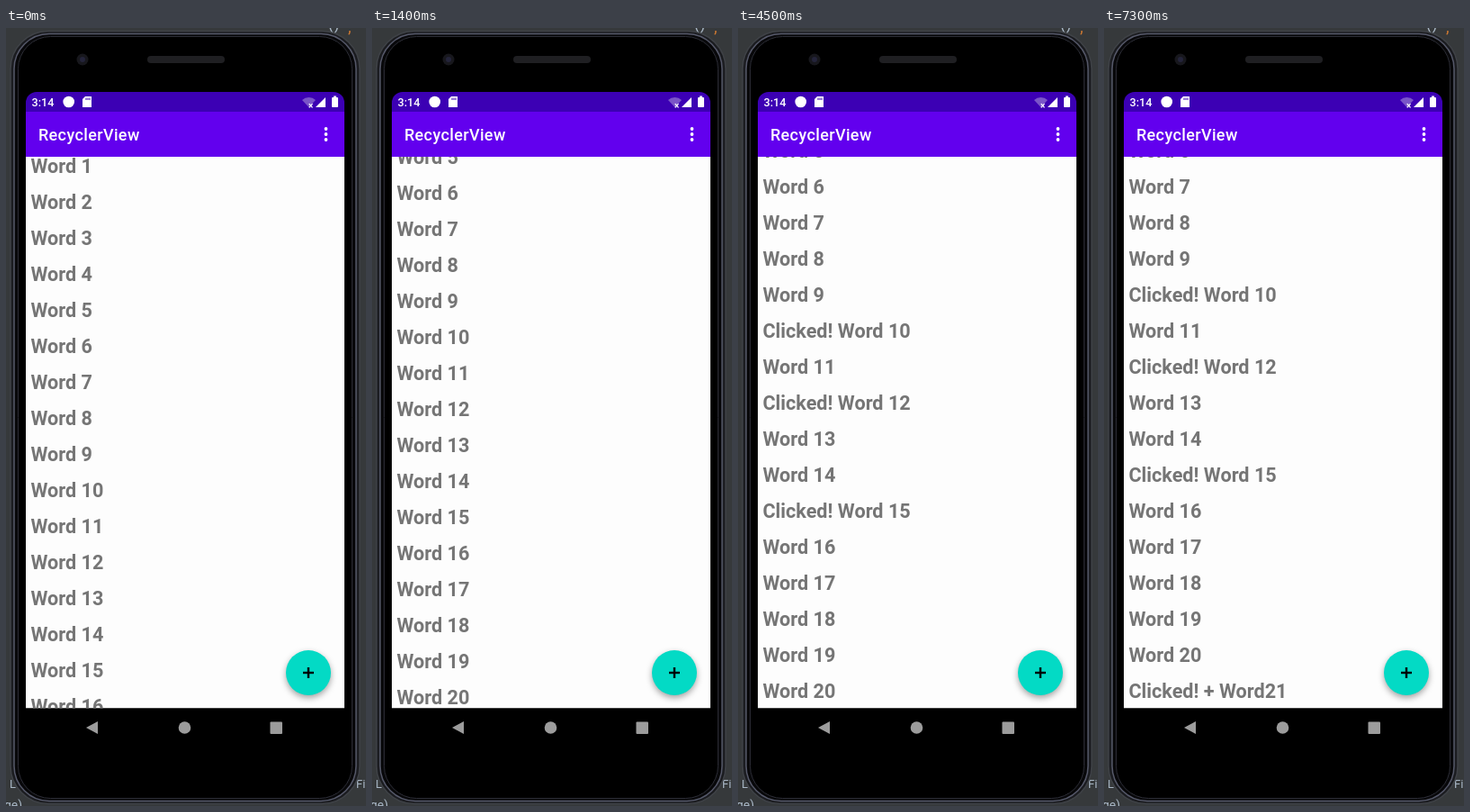
Recreate the animation shown at these times as an HTML page with a canvas. Size 400 px wide and 864 px high, loop 8 s.

```html
<!DOCTYPE html>
<html>
<head>
<meta charset="utf-8">
<style>
  html, body { margin: 0; height: 100%; overflow: hidden; background: #36393b; }
  canvas { display: block; width: 400px; height: 864px; }
</style>
</head>
<body>
<canvas id="stage" width="400" height="864"></canvas>
<script>
const ctx = document.getElementById('stage').getContext('2d');
const LOOP = 8000, STEP = 100, ROW = 40;
const LIST = { x: 22, y: 143, w: 354, h: 612.5 };
const PRIMARY = '#6200ee', PRIMARY_DARK = '#3c00b4', CODE = '#a9b7c6', NAV = '#9c9c9c';
const clicks = { 10: 2500, 12: 3600, 15: 4500, 21: 7300 };
const scrollKeys = [[700, 0], [800, 36], [900, 104], [1000, 156], [1600, 177]];

function rect(x, y, w, h, r, fill, stroke, line = 1) {
  ctx.beginPath();
  ctx.roundRect(x, y, w, h, r);
  if (fill) { ctx.fillStyle = fill; ctx.fill(); }
  if (stroke) { ctx.strokeStyle = stroke; ctx.lineWidth = line; ctx.stroke(); }
}

function circle(x, y, r, fill) {
  ctx.beginPath();
  ctx.arc(x, y, r, 0, 7);
  ctx.fillStyle = fill;
  ctx.fill();
}

function poly(points, fill) {
  ctx.beginPath();
  points.forEach(([x, y]) => ctx.lineTo(x, y));
  ctx.fillStyle = fill;
  ctx.fill();
}

function text(str, x, y, size, weight, fill, spacing = 0) {
  ctx.font = `${weight} ${size}px Roboto, sans-serif`;
  ctx.letterSpacing = spacing + 'px';
  ctx.fillStyle = fill;
  ctx.fillText(str, x, y);
}

function scrollAt(t) {
  if (t >= 5900) return 217;
  let [t0, s0] = scrollKeys[0];
  for (const [t1, s1] of scrollKeys) {
    if (t < t1) return t < t0 ? s0 : s0 + (s1 - s0) * (t - t0) / (t1 - t0);
    [t0, s0] = [t1, s1];
  }
  return s0;
}

function drawPhone() {
  rect(0, 0, 400, 864, 0, '#36393b');
  text('()', 358, 2, 18, 400, CODE);
  text(',', 380, 5, 18, 400, '#cc7832');
  text('L', 4, 844, 13, 400, CODE);
  text('Fi', 389, 844, 13, 400, CODE);
  text('ge)', -2, 868, 14, 400, CODE);
  rect(5, 3.5, 388, 858, 42, '#1b1c20', '#3f4247', 1.5);
  rect(9, 6.5, 380, 852, 39, '#08080a', '#56596a', 1.5);
  rect(13.5, 9.5, 371, 846, 36, '#000', '#2c2d36');
  circle(85, 35, 6.5, '#17171c');
  circle(85, 35, 3, '#24243a');
  rect(157, 31, 86, 8, 4, '#1f1f22');
  poly([[89, 777], [102, 770], [102, 784]], NAV);
  circle(198.5, 777, 6.8, NAV);
  rect(293.5, 770.5, 13.5, 13.5, 1, NAV);
}

function drawBars() {
  rect(22, 71, 354, 23, [12, 12, 0, 0], PRIMARY_DARK);
  rect(22, 93, 354, 50, 0, PRIMARY);
  text('3:14', 28.5, 87, 12.6, 500, '#fff');
  circle(69.7, 82, 6.3, '#fff');
  poly([[85, 79], [88, 76], [95, 76], [95, 88], [85, 88]], '#fff');
  for (const x of [88.5, 90.5, 92.5]) rect(x, 77.5, 1, 2.5, 0, PRIMARY_DARK);
  ctx.beginPath();
  ctx.moveTo(336.5, 88);
  ctx.arc(336.5, 88, 11, -2.32, -0.82);
  ctx.fillStyle = '#7a55c8';
  ctx.fill();
  text('×', 336, 90, 10, 700, '#fff');
  poly([[344, 88], [355, 77], [355, 88]], '#fff');
  rect(362, 77, 7, 11, 1, '#fff');
  rect(364, 75.5, 3, 2, 0, '#fff');
  text('RecyclerView', 36, 124.7, 18, 500, '#fff', 0.36);
  for (const y of [112, 118, 124]) circle(355.5, y, 1.9, '#fff');
}

function drawGlow(t, start, height, duration) {
  const p = (t - start) / duration;
  if (p < 0 || p >= 1) return;
  const k = (1 - p) ** 2, h = height * k, ry = 425 * h / 57;
  ctx.beginPath();
  ctx.ellipse(186, 755.5 - h + ry, 425, ry, 0, 0, 7);
  ctx.fillStyle = `rgba(98,0,238,${0.19 * k})`;
  ctx.fill();
}

function drawList(t) {
  ctx.save();
  ctx.beginPath();
  ctx.rect(LIST.x, LIST.y, LIST.w, LIST.h);
  ctx.clip();
  rect(LIST.x, LIST.y, LIST.w, LIST.h, 0, '#fdfdfd');
  const count = t >= 5900 ? 21 : 20, scroll = scrollAt(t);
  for (let i = 1; i <= count; i++) {
    const word = i > 20 ? '+ Word' + i : 'Word ' + i;
    const label = t >= clicks[i] ? 'Clicked! ' + word : word;
    text(label, 27.4, 161 + (i - 1) * ROW - scroll, 21.63, 700, '#757575');
  }
  drawGlow(t, 1700, 47, 600);
  drawGlow(t, 5100, 22, 400);
  ctx.restore();
}

function drawButton(t) {
  const pressed = t >= 5800 && t < 6200;
  ctx.save();
  ctx.shadowColor = 'rgba(0,0,0,.36)';
  ctx.shadowBlur = pressed ? 9 : 7;
  ctx.shadowOffsetY = pressed ? 4 : 3;
  circle(336, 716, 25, '#03dac5');
  ctx.restore();
  if (pressed) {
    const radius = t < 5900 ? 18 : 25;
    circle(336, 716, radius, `rgba(0,0,0,${t < 6100 ? 0.13 : 0.06})`);
  }
  rect(330, 714.8, 12, 2.4, 0, '#000');
  rect(334.8, 710, 2.4, 12, 0, '#000');
}

function frame(now) {
  const t = Math.floor(now % LOOP / STEP) * STEP;
  drawPhone();
  drawList(t);
  drawBars();
  drawButton(t);
  requestAnimationFrame(frame);
}
requestAnimationFrame(frame);
</script>
</body>
</html>
```
